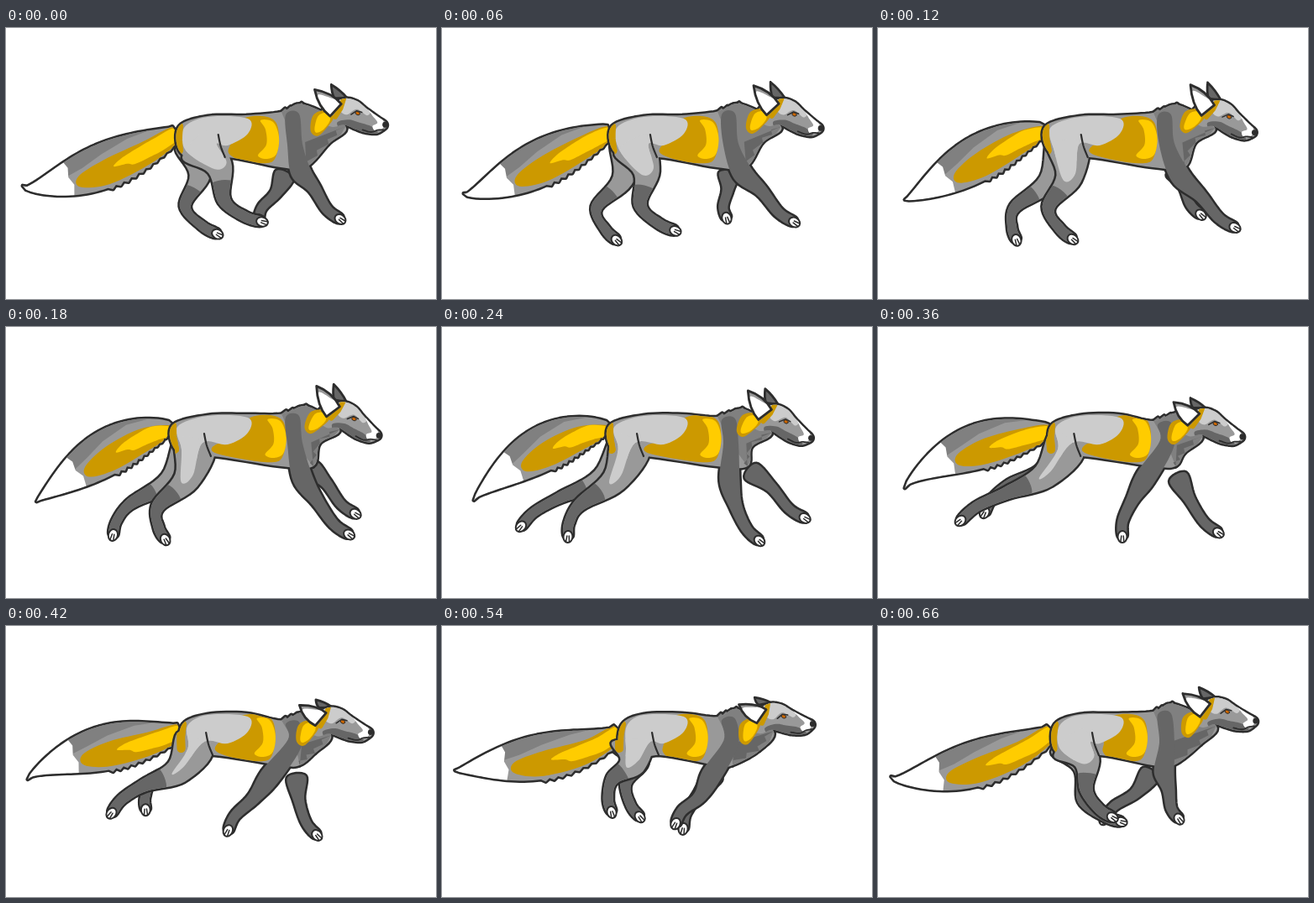
An HTML page with a canvas that plays this animation: 512 px wide and 323 px high, repeating every 0.72 s.

```html
<!DOCTYPE html>
<html lang="en">
<head>
<meta charset="utf-8">
<title>Running fox</title>
<style>
html, body { margin: 0; width: 100%; height: 100%; overflow: hidden; background: #fff; }
canvas { display: block; width: 512px; height: 323px; }
</style>
</head>
<body>
<canvas id="c" width="512" height="323"></canvas>
<script>
const ctx = document.getElementById('c').getContext('2d');
const LINE = '#2d2d2d', DARK = '#666', MID = '#808080', GREY = '#999', LIGHT = '#ccc', GOLD = '#c90', YELLOW = '#fc0';
const STEP = 60, STEPS = 12;

const pairs = a => a.reduce((out, v, i) => (i % 2 ? out[out.length - 1].push(v) : out.push([v]), out), []);
const mix = (a, b, t) => [a[0] + (b[0] - a[0]) * t, a[1] + (b[1] - a[1]) * t];
const add = (p, x, y) => [p[0] + x, p[1] + y];
const wave = (t, mean, amp, peak) => mean + amp * Math.cos(2 * Math.PI * (t - peak) / STEPS);

// Unit normal, left of the direction on screen when walking down (forward)
function normal(a, b) {
  const x = b[0] - a[0], y = b[1] - a[1], len = Math.hypot(x, y) || 1;
  return [y / len, -x / len];
}
function push(p, n, d) { return add(p, n[0] * d, n[1] * d); }

function spline(pts, x, closed) {
  const n = pts.length, i = closed ? Math.floor(x) : Math.min(Math.floor(x), n - 2), t = x - i;
  const [a, b, c, d] = [-1, 0, 1, 2].map(k => pts[closed ? ((i + k) % n + n) % n : Math.max(0, Math.min(n - 1, i + k))]);
  return [0, 1].map(k => b[k] + t / 2 * (c[k] - a[k] + t * (2 * a[k] - 5 * b[k] + 4 * c[k] - d[k] + t * (3 * (b[k] - c[k]) + d[k] - a[k]))));
}

function poly(pts, open) {
  const p = new Path2D();
  pts.forEach(q => p.lineTo(q[0], q[1]));
  if (!open) p.closePath();
  return p;
}
function curve(pts, open) {
  const out = [], spans = pts.length - (open ? 1 : 0);
  for (let i = 0; i < spans * 8 + (open ? 1 : 0); i++) out.push(spline(pts, i / 8, !open));
  return poly(out, open);
}

function fill(path, color) { ctx.fillStyle = color; ctx.fill(path); }
function line(path, width = 2.2, color = LINE) {
  ctx.strokeStyle = color;
  ctx.lineWidth = width;
  ctx.stroke(path);
}
function inside(path, paint) {
  ctx.save();
  ctx.clip(path);
  paint();
  ctx.restore();
}

// Loops that the joints run through in one stride, evenly timed
const HOCK = pairs([260,206, 203,214, 164,212, 153,198, 182,184, 224,186]);
const HIND_TOE = pairs([305,231, 232,252, 150,250, 98,231, 168,219, 236,227]);
const WRIST = pairs([367,191, 385,201, 350,214, 303,206, 295,206, 324,201]);
const FORE_TOE = pairs([398,228, 425,238, 378,255, 291,250, 256,238, 315,234]);

const loop = (path, t) => spline(path, t / 2, true);
function ankle(bend, toe) { return push(mix(bend, toe, .6), normal(bend, toe), -4.5); }

function hindLeg(t, dx, dy) {
  const hip = [226 + dx / 3, 138], hock = add(loop(HOCK, t), dx, dy), toe = add(loop(HIND_TOE, t), dx, dy);
  const knee = push(mix(hip, hock, .5), normal(hip, hock), 13);
  return [hip, knee, hock, ankle(hock, toe), toe];
}
function foreLeg(t, dx, dy) {
  const wrist = add(loop(WRIST, t), dx, dy), toe = add(loop(FORE_TOE, t), dx, dy);
  return [mix([335 + dx, 152], wrist, .5), wrist, ankle(wrist, toe), toe];
}

// Limb outline: joints widened along their normals
function limb(joints, widths) {
  const left = [], right = [], last = joints.length - 1;
  joints.forEach((p, i) => {
    const n = normal(joints[Math.max(0, i - 1)], joints[Math.min(last, i + 1)]);
    left.push(push(p, n, widths[i]));
    right.unshift(push(p, n, -widths[i]));
  });
  return curve([...left, ...right]);
}
function stocking([, knee, hock, heel, toe]) {
  fill(limb([mix(knee, hock, .45), hock, heel, toe], [13, 8.5, 8, 8]), DARK);
}

function paw(joints) {
  const [heel, toe] = joints.slice(-2);
  ctx.save();
  ctx.translate(toe[0], toe[1]);
  ctx.rotate(Math.atan2(toe[1] - heel[1], toe[0] - heel[0]));
  const pad = new Path2D();
  pad.ellipse(0, 0, 7, 5.5, 0, 0, 7);
  fill(pad, '#fff');
  line(pad, 2);
  [-2, 2].forEach(y => line(poly([[-1, y * .6], [6, y]], true), 1.5));
  ctx.restore();
}

// Jagged fur between two points
function fur(a, b, count, height) {
  const n = normal(a, b), out = [a];
  for (let i = 1; i <= count; i++) out.push(push(mix(a, b, (i - .2) / count), n, height), mix(a, b, i / count));
  return out;
}

function drawTail(t, root) {
  const base = add(root, -3, 8), tip = [wave(t, 26, 12, 4), wave(t, 190, 18, 3.2)];
  const spine = s => {
    const bow = Math.sin(Math.PI * s);
    return add(mix(base, tip, s), 0, Math.sqrt(Math.max(0, bow)) * wave(t, 0, 17, 9.7 + 1.8 * s) - 3 * bow);
  };
  // s runs from root to tip, v from the upper edge to the lower one
  const at = (s, v) => {
    const n = normal(spine(Math.max(0, s - .03)), spine(Math.min(1, s + .03)));
    const half = 9 * (1 - s) + 22 * Math.sin(Math.PI * s);
    return push(spine(s), n, -half * (1 - 2 * v));
  };
  const patch = sv => curve(pairs(sv).map(q => at(...q)));
  const edge = (v, from, to, jag = 0) => Array.from({ length: 41 }, (_, i) => {
    const s = from + (to - from) * i / 40;
    return at(s, v + (s < .5 && s > .05 && i % 2 ? jag : 0));
  });
  const shape = poly([...edge(0, 0, 1), ...edge(1, 1, 0, .06)]);
  line(shape, 5);
  fill(shape, GREY);
  inside(shape, () => {
    fill(poly([...edge(-.1, .08, .72), ...[[.71, .42], [.6, .36], [.46, .24], [.28, .1]].map(q => at(...q))]), MID);
    fill(patch([0,.05, .2,.3, .46,.38, .64,.52, .65,.8, .48,.93, .2,.98, 0,1]), GOLD);
    fill(patch([0,.15, .12,.3, .25,.42, .36,.5, .42,.6, .34,.67, .3,.76, .2,.8, .1,.86, 0,.85]), YELLOW);
    fill(poly([...edge(0, .7, 1), ...edge(1, 1, .7), at(.68, .7), at(.7, .45), at(.685, .2)]), '#fff');
  });
}

function drawEar(tip, front, back, bulge, color) {
  const ear = new Path2D();
  const f = add(mix(tip, front, .5), bulge, -bulge), b = add(mix(tip, back, .5), -bulge, bulge);
  ear.moveTo(...tip);
  ear.quadraticCurveTo(...f, ...front);
  ear.lineTo(...back);
  ear.quadraticCurveTo(...b, ...tip);
  fill(ear, color);
  if (color !== DARK) inside(ear, () => fill(curve([mix(tip, back, .2), mix(tip, front, .55), mix(tip, front, .95), add(back, 2, 2), add(mix(tip, back, .55), -3, 2)]), '#fff'));
  line(ear, 2.8);
}

function draw(t) {
  // Head turns about the nose; loc() maps nose-relative points to the stage
  const nose = [wave(t, 443.5, 9, .3), wave(t, 123, 10, 4.7)], turn = wave(t, -1, 9.5, 3.3) * Math.PI / 180;
  const sin = Math.sin(turn), cos = Math.cos(turn);
  const loc = flat => pairs(flat).map(([x, y]) => add(nose, x * cos - y * sin, x * sin + y * cos));

  const root = [wave(t, 206, 8, 9), 117], mid = [286, 104];
  const nape = [wave(t, 356, 4, 4), wave(t, 97, 6.5, 6.7)], withers = [328, nape[1] + 9];
  const [throat, bib] = loc([-48,0, -69,20]);
  const chest = [wave(t, 356, 10, 2.7), 166], groin = [wave(t, 253, 12, 10.8), 154];
  const rump = [wave(t, 206, 5, 9), 146], rib = wave(t, 325, 8.5, 3);

  const near = hindLeg(t, 0, 0), far = hindLeg(t + 1.3, -12, 0), knee = near[1];
  const farFore = foreLeg(t - 2.6, 8, -6);
  const nearFore = [[341, withers[1] + 3], [344, 139], ...foreLeg(t, 0, 0)];

  ctx.fillStyle = '#fff';
  ctx.fillRect(0, 0, 512, 323);
  ctx.lineJoin = ctx.lineCap = 'round';

  const farForeShape = limb(farFore, [11, 6.5, 5.5, 5]);
  line(farForeShape, 5);
  fill(farForeShape, DARK);
  paw(farFore);
  const farHindShape = limb(far, [20, 12, 6.5, 5.5, 5]);
  line(farHindShape, 5);
  fill(farHindShape, GREY);
  inside(farHindShape, () => stocking(far));
  paw(far);

  drawTail(t, root);
  const farEar = loc([-63,-52 + wave(t, 4, 5, 8), -45,-34, -60,-34]);
  drawEar(...farEar, 1.5, DARK);

  const torso = curve([root, [240, 105], mid, withers, nape, throat, bib, chest, [327, 166], groin, [230, 160], rump]);
  const ruff = poly([...fur(throat, bib, 2, -5), ...fur(bib, chest, 2, -5), mix(nape, chest, .6)]);
  const mane = poly([...fur(withers, nape, 4, 2.5), chest]);
  const head = curve(loc([-50,-33, -34,-30, -22,-20, -8,-9, 0,-3, 1,2, -3,6, -12,10, -26,8, -36,4, -50,-2, -64,0, -76,-8, -74,-22]));
  const fore = limb(nearFore, [8, 9, 12, 7.5, 6, 5]);
  const hind = limb(near, [23, 15, 7.5, 6, 5]);

  const coat = () => {
    fill(curve([[rib-44,109], [rib-20,105], [rib-4,112], [rib,132], [rib-4,154], [rib-14,161], [rib-42,159], add(groin, 3, -4), add(groin, 4, -14), [rib-52,132]]), GOLD);
    fill(curve([[rib-22,110], [rib-7,112], [rib,130], [rib-3,150], [rib-14,156], [rib-25,152], [rib-15,139], [rib-16,121]]), YELLOW);
    fill(curve([add(root, 6, 2), [240, 106], add(mid, 2, 4), add(mid, 2, 22), add(mid, -22, 36), add(groin, -12, -16), add(knee, 8, -6), add(knee, -6, 2), add(rump, 8, 0)]), LIGHT);
    line(curve([root, add(mix(root, rump, .5), -1, 0), rump], true), 10, GOLD);
  };

  // One shared outline, then the fills on top
  [torso, ruff, mane, head, fore, hind].forEach(p => line(p, 5));
  fill(mane, MID);
  fill(torso, GREY);
  fill(hind, GREY);
  inside(torso, () => {
    fill(poly([withers, add(nape, 0, -5), throat, add(bib, 8, 0), chest, nearFore[1]]), MID);
    coat();
  });
  inside(hind, () => { coat(); stocking(near); });
  fill(ruff, DARK);
  fill(fore, DARK);
  fill(head, GREY);
  line(curve([add(groin, -10, -27), add(groin, -7, -13), add(groin, -2, 0)], true));
  paw(nearFore);
  paw(near);

  // Neck patch and face
  fill(curve(loc([-86,-15, -72,-20, -62,-12, -70,0, -82,10, -90,3])), GOLD);
  fill(curve(loc([-80,-14, -70,-17, -66,-9, -74,2, -83,6, -85,0])), YELLOW);
  inside(head, () => {
    fill(curve(loc([-58,-5, -44,-8, -32,-4, -18,1, -10,8, -20,14, -50,6])), DARK);
    fill(curve(loc([-52,-36, -32,-32, -18,-19, -22,-12, -34,-20, -46,-14, -54,-20])), LIGHT);
    fill(curve(loc([-20,-20, -6,-9, -2,-1, -5,5, -13,7, -16,1, -10,-3, -16,-12])), '#fff');
    line(poly(loc([-49,-33, -53,-22, -60,-12]), true), 6, GOLD);
  });
  const [eye] = loc([-33,-15]);
  line(poly(loc([-41,-14, -34,-18, -28,-16]), true), 1.5);
  const iris = new Path2D(), snout = new Path2D();
  iris.ellipse(eye[0], eye[1], 2.8, 2, .4, 0, 7);
  snout.ellipse(nose[0] - 1, nose[1], 3.2, 3.4, 0, 0, 7);
  fill(iris, '#c60');
  line(iris, 1);
  fill(snout, LINE);
  line(curve(loc([-3,6, -10,6, -18,8, -28,5]), true), 1.8);

  const ear = loc([-83,-47 + wave(t, 4, 5, 8), -52,-27, -66,-13]);
  drawEar(...ear, 5, GREY);
}

let shown = -1;
function tick() {
  const step = Math.floor(performance.now() / STEP) % STEPS;
  if (step !== shown) draw(shown = step);
  requestAnimationFrame(tick);
}
tick();
</script>
</body>
</html>
```
